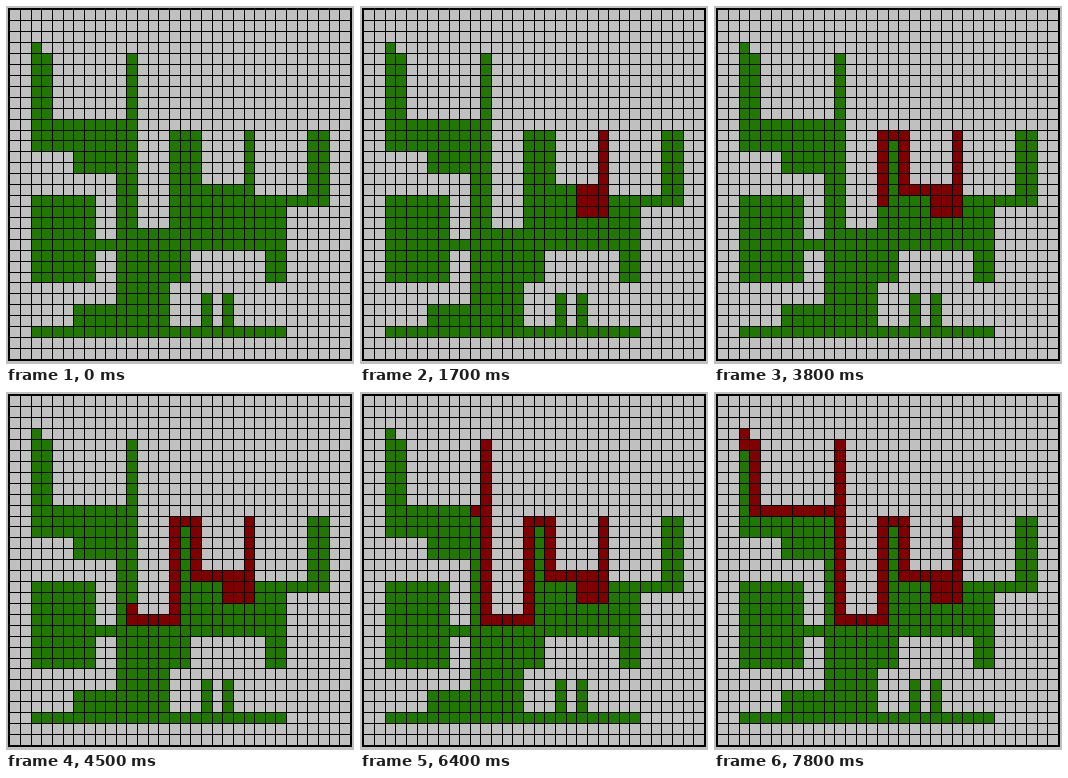
An HTML page with a canvas that plays this animation: 348 px wide and 358 px high, repeating every 8000 ms.

```html
<!DOCTYPE html>
<html lang="en">
<head>
<meta charset="utf-8">
<title>Grid trace</title>
<style>
  html, body { margin: 0; width: 100%; height: 100%; overflow: hidden; background: #c0c0c0; }
  canvas { display: block; }
</style>
</head>
<body>
<canvas id="stage" width="348" height="358"></canvas>
<script>
const LOOP = 8000, TICK = 100, SIZE = 32;
const GREY = '#c0c0c0', GREEN = '#207800', RED = '#800000';
const ctx = document.getElementById('stage').getContext('2d');

const gridX = col => Math.floor(3.95 + 10.64 * col);
const gridY = row => Math.floor(3.95 + 10.92 * row);

// Green areas: first column, first row, columns, rows.
const areas = [
  [2, 3, 1, 1], [2, 4, 2, 6], [11, 4, 1, 6], [2, 10, 10, 3], [6, 13, 6, 2],
  [10, 15, 2, 5], [2, 17, 6, 8], [8, 21, 2, 1],
  [15, 11, 2, 9], [17, 11, 1, 6], [22, 11, 1, 6], [28, 11, 2, 6],
  [17, 16, 6, 1], [17, 17, 13, 1], [17, 18, 9, 2],
  [10, 20, 16, 2], [10, 22, 7, 3], [24, 22, 2, 3], [10, 25, 5, 2],
  [6, 27, 9, 2], [18, 26, 1, 3], [20, 26, 1, 3], [2, 29, 24, 1]
];

// Each run: start time, first cell, moves, and cells added per tick.
const runs = [
  [500, 21, 17, 'R1 D1 L2 U2 R2 U5', '2111111111111'],
  [2400, 19, 16, 'L2 U5', '2111111'],
  [3200, 16, 11, 'L1 D9 L4 U1', '21111111111211'],
  [4700, 11, 18, 'U5', '2121'],
  [5200, 11, 12, 'U8', '2121111'],
  [6400, 10, 10, '', '1'],
  [6600, 9, 10, 'L5', '2121'],
  [7100, 3, 10, 'U6', '21211'],
  [7700, 2, 4, 'U1', '11']
];

const dirs = { L: [-1, 0], R: [1, 0], U: [0, -1], D: [0, 1] };

function walk(col, row, moves) {
  const path = [[col, row]];
  for (const move of moves.split(' ').filter(Boolean)) {
    const [dx, dy] = dirs[move[0]];
    for (let n = +move.slice(1); n > 0; n--) path.push([col += dx, row += dy]);
  }
  return path;
}

const trail = runs.flatMap(([start, col, row, moves, pace]) => {
  const path = walk(col, row, moves);
  const times = [...pace].flatMap((n, i) => Array(+n).fill(start + i * TICK));
  return path.map(([c, r], i) => ({ c, r, at: times[i] }));
});

function fillCells(col, row, cols, rows, color) {
  const x = gridX(col), y = gridY(row);
  ctx.fillStyle = color;
  ctx.fillRect(x, y, gridX(col + cols) - x, gridY(row + rows) - y);
}

function drawGrid() {
  const left = gridX(0), top = gridY(0);
  const right = gridX(SIZE), bottom = gridY(SIZE);
  ctx.fillStyle = '#000';
  for (let i = 0; i <= SIZE; i++) {
    ctx.fillRect(gridX(i), top, 1, bottom - top + 1);
    ctx.fillRect(left, gridY(i), right - left + 1, 1);
  }
  ctx.lineWidth = 2;
  ctx.strokeStyle = '#000';
  ctx.strokeRect(left, top, right - left + 1, bottom - top + 1);
}

function draw(t) {
  ctx.fillStyle = GREY;
  ctx.fillRect(0, 0, 348, 358);
  for (const area of areas) fillCells(...area, GREEN);
  for (const { c, r, at } of trail) if (at <= t) fillCells(c, r, 1, 1, RED);
  drawGrid();
}

const begin = performance.now();
function frame() {
  draw((performance.now() - begin) % LOOP);
  requestAnimationFrame(frame);
}
frame();
</script>
</body>
</html>
```
